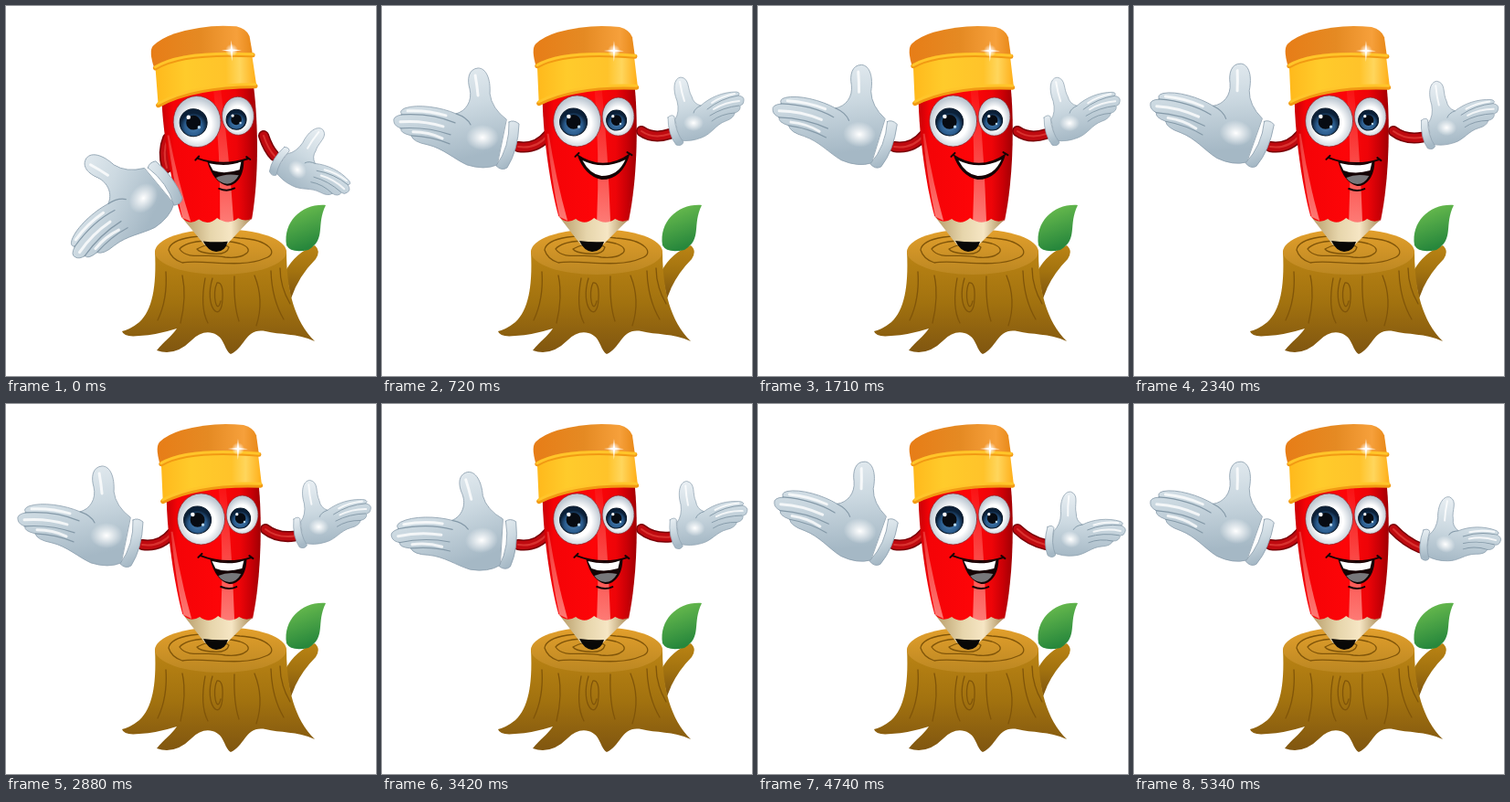
Animation of 405x405 px, one loop 5.37 s. Source, as an HTML page:

```html
<!DOCTYPE html>
<html lang="en">
<head>
<meta charset="utf-8">
<title>Waving pencil</title>
<style>
html, body { margin: 0; width: 100%; height: 100%; overflow: hidden; background: #fff; }
svg { display: block; width: 100vw; height: 100vh; }
</style>
</head>
<body>
<svg viewBox="0 0 405 405" fill="none" stroke-linecap="round" stroke-linejoin="round">
  <defs>
    <linearGradient id="red">
      <stop offset="0" stop-color="#c90006"/><stop offset=".12" stop-color="#f50307"/>
      <stop offset=".55" stop-color="#fd0508"/><stop offset=".78" stop-color="#ee0408"/>
      <stop offset=".9" stop-color="#c90006"/><stop offset="1" stop-color="#a00004"/>
    </linearGradient>
    <linearGradient id="glow" x2="0" y2="1">
      <stop offset="0" stop-color="#ff8a80" stop-opacity=".1"/>
      <stop offset="1" stop-color="#ff9089" stop-opacity=".85"/>
    </linearGradient>
    <linearGradient id="eraser">
      <stop offset="0" stop-color="#e77d17"/><stop offset=".5" stop-color="#e58a23"/>
      <stop offset=".85" stop-color="#f6a03b"/><stop offset="1" stop-color="#e88817"/>
    </linearGradient>
    <linearGradient id="ferrule">
      <stop offset="0" stop-color="#ffb91c"/><stop offset=".3" stop-color="#ffcb2b"/>
      <stop offset=".7" stop-color="#ffc32a"/><stop offset=".84" stop-color="#ffd65c"/>
      <stop offset="1" stop-color="#ffae18"/>
    </linearGradient>
    <linearGradient id="wood">
      <stop offset="0" stop-color="#b59a66"/><stop offset=".4" stop-color="#e6d5ab"/>
      <stop offset=".7" stop-color="#f6e6c4"/><stop offset="1" stop-color="#a88b58"/>
    </linearGradient>
    <linearGradient id="bark" x2="0" y2="1">
      <stop offset="0" stop-color="#bb8414"/><stop offset=".5" stop-color="#a2720f"/>
      <stop offset="1" stop-color="#7f5510"/>
    </linearGradient>
    <linearGradient id="top" x2="0" y2="1">
      <stop offset="0" stop-color="#e3a02c"/><stop offset="1" stop-color="#bb8722"/>
    </linearGradient>
    <linearGradient id="leaf" x2=".3" y2="1">
      <stop offset="0" stop-color="#72c250"/><stop offset="1" stop-color="#27873c"/>
    </linearGradient>
    <linearGradient id="glove" x2=".25" y2="1">
      <stop offset="0" stop-color="#eaf0f4"/><stop offset=".5" stop-color="#ccd9e1"/>
      <stop offset="1" stop-color="#a5b8c5"/>
    </linearGradient>
    <radialGradient id="shine">
      <stop offset="0" stop-color="#fff"/><stop offset="1" stop-color="#fff" stop-opacity="0"/>
    </radialGradient>
    <radialGradient id="eye" cx=".5" cy=".55">
      <stop offset=".6" stop-color="#fff"/><stop offset="1" stop-color="#bfc9d3"/>
    </radialGradient>
    <radialGradient id="iris" cx=".5" cy=".65">
      <stop offset="0" stop-color="#4d83b5"/><stop offset=".65" stop-color="#295a8b"/>
      <stop offset="1" stop-color="#0b2038"/>
    </radialGradient>
  </defs>

  <g id="stump">
    <path fill="url(#bark)" d="M306 290Q317 270 338 262Q345 268 339 277Q320 296 312 320Z"/>
    <path fill="url(#bark)" d="M163 268C165 308 160 333 146 346Q136 354 127 356Q129 363 146 361Q165 360 187 353C181 362 172 368 165 377Q185 384 203 366Q214 355 226 358C240 362 238 376 246 381C262 374 262 352 284 356C300 360 318 358 338 367C316 345 307 312 307 268Z"/>
    <ellipse cx="235" cy="269" rx="72" ry="25" fill="url(#top)"/>
    <g stroke="#805509" stroke-width="1.3">
      <path d="M178 267C180 253 217 248 256 254C289 256 299 271 284 276C257 288 216 277 193 281Q181 277 178 267Z"/>
      <path d="M190 266C199 255 235 255 256 260C276 267 260 277 240 275C220 270 199 279 190 266Z"/>
      <path d="M209 266Q231 255 244 264Q242 273 224 271Q212 270 209 266Z"/>
      <path d="M175 291Q177 321 166 344M193 295Q198 318 191 347M218 298Q212 330 221 347M226 298C216 330 236 350 237 320Q238 302 231 303C225 315 231 340 235 323M250 296Q249 327 255 345M272 295Q283 322 274 350M290 290Q291 321 304 343M300 287Q300 307 311 326"/>
    </g>
    <path fill="url(#leaf)" d="M350 218C325 216 303 235 307 262Q312 271 331 267C351 255 339 240 350 218Z"/>
  </g>

  <g id="arms"></g>

  <g id="pencil">
    <path fill="url(#red)" d="M175 104Q210 84 276 89C280 130 279 190 270 234L256 243H205L193 230C184 198 176 145 175 104Z"/>
    <path fill="url(#glow)" d="M180 140Q185 190 194 231L203 235Q190 190 182 140ZM232 92H240Q247 160 250 238H235Q238 160 232 92Z"/>
    <path fill="url(#wood)" d="M193 230Q201 240 212 233Q222 241 232 232Q244 241 255 233Q264 238 270 233L241 262H218Z"/>
    <path fill="#090807" d="M216 257Q230 259 243 258Q240 269 230 269Q221 268 216 257Z"/>
    <path fill="url(#eraser)" d="M168 67Q162 48 167 42Q175 34 191 29Q226 19 259 23Q270 26 273 34L276 55Z"/>
    <path fill="url(#ferrule)" d="M169 65Q196 49 275 54L279 87Q215 86 171 106Z"/>
    <path stroke="#f29a13" stroke-width="5" d="M169 66Q198 49 276 55M171 107Q210 87 278 89"/>
    <path stroke="#ffc52a" stroke-width="3" d="M169 65Q198 48 276 54M171 105Q210 85 278 87"/>
    <circle cx="253" cy="49" r="7" fill="url(#shine)"/>
    <path fill="#fff" d="M253 38L254 48L264 49L254 50L253 61L252 50L242 49L252 48Z"/>
    <ellipse cx="258" cy="121" rx="17.5" ry="21" fill="url(#eye)" stroke="#8d2027" stroke-width=".7"/>
    <ellipse cx="213" cy="126" rx="26" ry="28" fill="url(#eye)" stroke="#8d2027" stroke-width=".7"/>
    <g id="irises"></g>
    <g id="smile">
      <path fill="#150304" d="M213 162Q242 182 271 161Q263 190 240 190Q221 186 213 162Z"/>
      <path fill="#fff" d="M219 169Q242 180 266 168Q258 186 240 186Q227 184 219 169Z"/>
      <path stroke="#150304" stroke-width="2" d="M211 165L215 161M268 160L273 163"/>
    </g>
    <g id="laugh">
      <path fill="#150304" d="M223 170Q245 176 263 169C263 186 255 197 244 197Q229 193 223 170Z"/>
      <path fill="#fff" d="M225 172Q245 177 260 171L258 180Q241 185 229 180Z"/>
      <path fill="#77777a" d="M232 188Q243 183 257 186Q252 195 244 195Q236 194 232 188Z"/>
      <path stroke="#150304" stroke-width="2" d="M212 166Q240 177 268 168M210 168L214 164M266 166L270 169M235 200Q244 204 252 200"/>
    </g>
  </g>

  <g id="leftHand">
    <path fill="url(#glove)" stroke="#8c9fae" stroke-width=".8" d="M135 123Q119 111 117 95C118 79 113 67 104 67C93 68 92 80 95 90C98 103 91 114 80 117C64 110 38 106 24 111Q17 114 21 118Q10 120 12 126Q13 131 20 133Q18 138 31 141Q33 148 49 151C66 155 77 166 92 173Q111 179 125 173Z"/>
    <g stroke="#8499a8" stroke-width="1.2">
      <path d="M20 118Q54 116 79 127M19 133Q48 131 74 140M31 141Q54 142 73 150M80 117Q92 121 96 129"/>
    </g>
    <g stroke="#fff" stroke-width="3" opacity=".8">
      <path d="M27 114Q49 113 69 119M19 126Q43 124 66 131M33 137Q50 137 65 144M101 75Q103 86 104 97"/>
    </g>
    <ellipse cx="109" cy="143" rx="18" ry="14" fill="url(#shine)"/>
    <path fill="url(#glove)" stroke="#8c9fae" stroke-width=".8" d="M138 126Q143 123 149 128Q148 157 136 176Q130 180 124 174Q139 153 138 126Z"/>
  </g>

  <g id="rightHand">
    <path fill="url(#glove)" stroke="#8c9fae" stroke-width=".7" d="M321 124Q326 116 323 104C318 92 319 79 327 78C337 79 334 91 339 99Q341 107 349 109C359 100 373 94 388 94Q393 95 390 98Q397 99 396 104Q396 108 392 109Q393 115 386 117Q385 123 376 126C365 130 361 140 350 144Q338 149 326 147Z"/>
    <g stroke="#8499a8" stroke-width=".9">
      <path d="M390 98Q371 101 356 113M391 109Q373 111 359 120M386 117Q371 118 361 126M349 109Q342 112 341 117"/>
    </g>
    <g stroke="#fff" stroke-width="2" opacity=".8">
      <path d="M386 96Q371 99 361 106M391 104Q376 105 363 113M326 83Q328 95 331 104"/>
    </g>
    <ellipse cx="341" cy="128" rx="11" ry="9" fill="url(#shine)"/>
    <path fill="url(#glove)" stroke="#8c9fae" stroke-width=".7" d="M313 122Q317 118 320 121Q321 138 330 149Q328 154 322 152Q313 141 313 122Z"/>
  </g>
</svg>
<script>
const LOOP = 5370, RISE = 540, WAVE = 720, DIP_END = 150;
const LOW = -8, HIGH = 8, START = -51, DIP = -61;
const byId = id => document.getElementById(id);
const clamp = v => Math.max(0, Math.min(1, v));
const ease = v => (1 - Math.cos(Math.PI * clamp(v))) / 2;
const swing = (t, period) => (1 - Math.cos(2 * Math.PI * t / period)) / 2;
const mix = (a, b, k) => a + (b - a) * k;
const mixPoint = (a, b, k) => a.map((v, i) => mix(v, b[i], k));

function addPath(parent, color, width) {
  const path = document.createElementNS('http://www.w3.org/2000/svg', 'path');
  path.setAttribute('stroke', color);
  path.setAttribute('stroke-width', width);
  parent.append(path);
  return path;
}

const makeArm = () => [['#780006', 12], ['#bf0a10', 9], ['#d9322f', 2]]
  .map(([color, width]) => addPath(byId('arms'), color, width));
const leftArm = makeArm(), rightArm = makeArm();

byId('irises').innerHTML = [[209, 127, 15], [256, 125, 11]].map(([x, y, r]) => `
  <circle cx="${x}" cy="${y}" r="${r}" fill="url(#iris)" stroke="#0b1a2b"/>
  <circle cx="${x}" cy="${y}" r="${r * .53}" fill="#070b12"/>
  <circle cx="${x - r * .35}" cy="${y - r * .4}" r="${r * .15}" fill="#fff"/>
  <circle cx="${x + r * .4}" cy="${y + r * .35}" r="${r * .11}" fill="#b9d9f2"/>`).join('');

function drawArm(paths, [x, y, cx, cy, ex, ey]) {
  for (const path of paths) path.setAttribute('d', `M${x} ${y}Q${cx} ${cy} ${ex} ${ey}`);
}

function place(id, [px, py], angle, [x, y]) {
  byId(id).setAttribute('transform', `translate(${x} ${y}) rotate(${angle}) translate(${-px} ${-py})`);
}

// The hand dips, rises, waves and then rests raised.
function leftAngle(t) {
  if (t < DIP_END) return mix(START, DIP, ease(t / DIP_END));
  if (t < RISE) return mix(DIP, LOW, ease((t - DIP_END) / (RISE - DIP_END)));
  if (t >= 4140) return HIGH;
  return mix(HIGH, LOW, swing(t - 3780, t < 3780 ? WAVE : WAVE / 2));
}

const WAVE_START = 4260;
const rightKeys = [[0, 48], [RISE, 0], [1620, 0], [2340, 4], [3420, 6], [4140, 3.5], [WAVE_START, 2]];
function rightAngle(t) {
  if (t >= WAVE_START) return mix(2, 21, swing(t - WAVE_START, WAVE));
  const i = rightKeys.findIndex(([time]) => time > t);
  const [t0, a0] = rightKeys[i - 1], [t1, a1] = rightKeys[i];
  return mix(a0, a1, ease((t - t0) / (t1 - t0)));
}

function draw(t) {
  const lowered = 1 - ease(t / RISE);
  byId('pencil').setAttribute('transform', `rotate(${mix(.25, -1.6, lowered)} 231 265)`);

  const smiling = t >= 420 && t < 2010;
  byId('smile').style.display = smiling ? '' : 'none';
  byId('laugh').style.display = smiling ? 'none' : '';

  const left = leftAngle(t);
  const drop = clamp((LOW - left) / (LOW - START));
  place('leftHand', [145, 152], left, mixPoint([146, 153], [180, 188], drop));
  drawArm(leftArm, mixPoint([182, 141, 169, 157, 149, 154], [177, 145, 171, 160, 176, 177], drop));

  const right = rightAngle(t);
  const wrist = [320 + .2 * right - .0133 * right ** 2, 136 + .95 * right - .0055 * right ** 2];
  place('rightHand', [320, 136], right, wrist);
  drawArm(rightArm, [284 - 2 * lowered, 137 + 5 * lowered, mix(297, 287, lowered),
    mix(146, 157, right / 48), wrist[0] - 5, wrist[1] + 4 - 9 * lowered]);
}

function frame(now) {
  draw(now % LOOP);
  requestAnimationFrame(frame);
}
draw(0);
requestAnimationFrame(frame);
</script>
</body>
</html>
```
